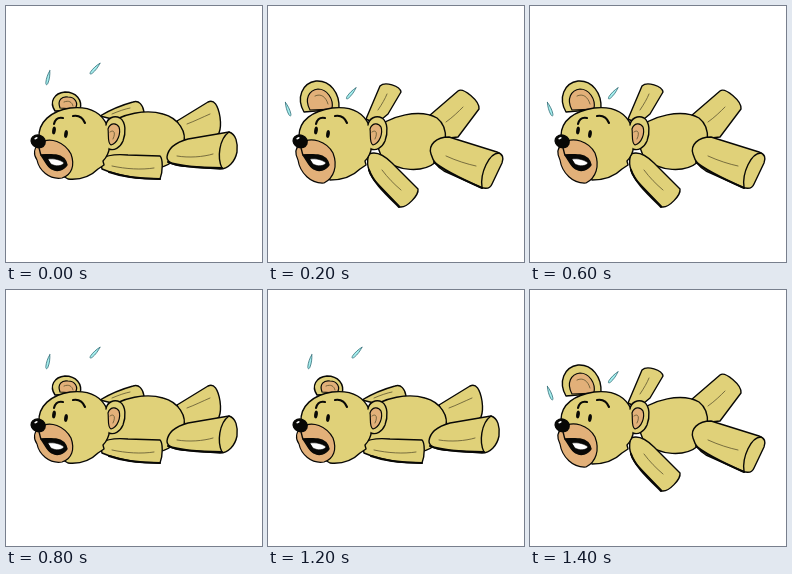
Animation, 256 px wide and 256 px high, one loop 1.6 s. Source, as an HTML page:

```html
<!DOCTYPE html>
<html lang="en">
<head>
<meta charset="utf-8">
<title>Tired teddy</title>
<style>
html, body { margin: 0; width: 100%; height: 100%; overflow: hidden; background: #fff; }
svg { display: block; width: 100vw; height: 100vh; }
path, ellipse { stroke: #080806; stroke-width: 1.4; stroke-linejoin: round; stroke-linecap: round; }
.fur { fill: #e0d179; }
.skin { fill: #e2b079; stroke-width: 1.2; }
.ink { fill: #080806; }
.line { fill: none; }
.thin { fill: none; stroke: #5d5530; stroke-width: .8; }
.bold { fill: none; stroke-width: 2.1; }
.teeth { fill: #fff; stroke-width: .6; }
.drop { fill: #a5eeee; stroke: #2a6670; stroke-width: .7; }
</style>
</head>
<body>
<svg id="stage" viewBox="0 0 256 256"></svg>
<script>
const STEP = 200;
const path = (kind, d) => `<path class="${kind}" d="${d}"/>`;
const eye = (x, y) => `<ellipse class="ink" cx="${x}" cy="${y}" rx="1.1" ry="3.2" transform="rotate(8 ${x} ${y})"/>`;
const drop = (x, y, turn) =>
  `<path class="drop" transform="translate(${x} ${y}) rotate(${turn})" d="M0 -7.5C1.2 -4 1.8 1 1.2 5C.8 7.5 -.5 7.5 -1 5C-1.6 1 -1.2 -4 0 -7.5Z"/>`;

const rightEar = [
  path('fur', 'M100 119C101 112 108 109 114 112C120 116 120 127 117 135C114 142 108 145 103 143'),
  path('skin', 'M102 123C104 117 110 116 113 121C115 127 112 137 105 139C101 137 103 128 102 123Z'),
  path('thin', 'M104 126C108 123 110 127 107 133')
].join('');

const face = [
  path('ink', 'M35 149C40 148 45 149 50 149C56 150 60 154 61 159C58 164 51 166 46 163C41 161 40 156 35 149Z'),
  path('teeth', 'M42 153C48 152 55 154 58 157C56 160 50 161 45 158Z'),
  path('line', 'M33 142C34 145 34 147 35 149'),
  '<ellipse class="ink" cx="32.2" cy="135.3" rx="7.2" ry="6.2" transform="rotate(22 32.2 135.3)"/>',
  '<ellipse cx="30" cy="132.2" rx="1.8" ry=".9" transform="rotate(-25 30 132.2)" style="fill:#fff;stroke:none"/>',
  path('bold', 'M48 118C49 114 52 111 57 112'),
  path('bold', 'M67 110C73 109 77 112 79 117'),
  eye(48, 124.5),
  eye(60, 128)
].join('');

const lying = [
  path('fur', 'M94 110C104 104 116 99 127 96C133 94 137 99 138 106L118 116Z'),
  path('thin', 'M106 108C113 105 119 103 124 102'),
  path('fur', 'M171 115L202 96C208 93 212 99 214 111C215 118 215 122 213 127L200 138L179 134Z'),
  path('thin', 'M181 118C189 115 197 111 204 108'),
  path('fur', 'M100 120C116 107 141 103 157 108C172 112 182 126 177 139C174 152 163 162 145 163L98 160Z'),
  path('fur', 'M94 153C101 149 112 148 122 149L154 150C157 153 157 165 154 173L130 172C118 170 105 167 96 163Z'),
  path('thin', 'M106 160C120 163 135 164 148 162'),
  path('bold', 'M103 166C117 171 135 173 154 173'),
  path('fur', 'M161 151C162 142 171 136 182 133L223 126C230 128 232 137 231 146C229 156 222 163 214 163L176 160C167 159 161 156 161 151Z'),
  path('line', 'M223 126C213 133 211 152 216 162'),
  path('thin', 'M171 150C183 152 197 151 207 148'),
  path('bold', 'M162 156C175 161 200 162 216 162'),
  path('fur', 'M49 105C43 96 48 87 59 86C70 86 77 94 74 104Z'),
  path('skin', 'M54 102C51 94 56 90 62 91C69 91 73 97 69 103Z'),
  path('thin', 'M58 96C63 94 66 96 67 100'),
  path('fur', 'M33 132C32 116 45 105 64 102C82 100 95 106 101 119C107 134 104 148 97 155L98 159L92 163C84 171 73 174 62 173L40 160Z'),
  rightEar,
  path('skin', 'M33 138C44 129 59 137 65 148C69 159 66 169 56 172C43 174 33 164 31 154C27 148 28 142 33 138Z'),
  face,
  drop(42, 72, 14),
  drop(88.8, 62.8, 43)
].join('');

const sprawled = [
  path('fur', 'M98 113L112 80C117 75 132 80 133 86L120 108L108 118Z'),
  path('thin', 'M110 104C114 98 117 93 119 88'),
  path('fur', 'M161 110L190 85C195 81 212 95 211 103L190 131L172 133Z'),
  path('thin', 'M178 116C185 111 190 106 195 101'),
  path('fur', 'M104 126C122 108 153 103 169 112C182 122 179 145 168 156C155 167 130 166 114 152Z'),
  path('fur', 'M101 148C108 145 116 149 124 157L150 183C151 189 139 202 132 201L106 174C100 166 98 156 101 148Z'),
  path('thin', 'M114 164C120 172 126 178 133 184'),
  path('bold', 'M101 164C105 176 118 188 131 201'),
  path('fur', 'M163 148C160 139 168 131 181 131L229 146C235 148 236 152 234 157L224 178C222 183 217 183 212 181L176 165C169 161 165 155 163 148Z'),
  path('line', 'M231 147C221 147 212 167 214 181'),
  path('thin', 'M178 150C189 155 199 158 208 160'),
  path('bold', 'M166 156C176 165 196 174 214 182'),
  path('fur', 'M36 106C28 92 34 77 48 75C62 74 72 87 71 103Z'),
  path('skin', 'M42 104C36 93 41 84 50 83C59 83 66 93 64 103Z'),
  path('thin', 'M47 90C53 87 58 91 60 98'),
  path('fur', 'M31 130C31 114 45 105 64 102C82 100 95 106 101 119C107 134 104 148 97 155L98 159L92 163C84 171 73 174 62 174L38 160Z'),
  rightEar,
  path('skin', 'M32 138C43 129 59 136 65 147C70 160 66 172 56 177C43 178 32 167 30 154C27 148 27 142 32 138Z'),
  face,
  drop(20, 103.5, -20),
  drop(83, 87.5, 41)
].join('');

const poses = [lying, sprawled];
const stage = document.getElementById('stage');
let shown = -1;

function draw(time) {
  const index = Math.floor(time / STEP) % poses.length;
  if (index !== shown) stage.innerHTML = poses[shown = index];
}

const start = performance.now();
function tick() {
  draw(performance.now() - start);
  requestAnimationFrame(tick);
}
tick();
</script>
</body>
</html>
```
